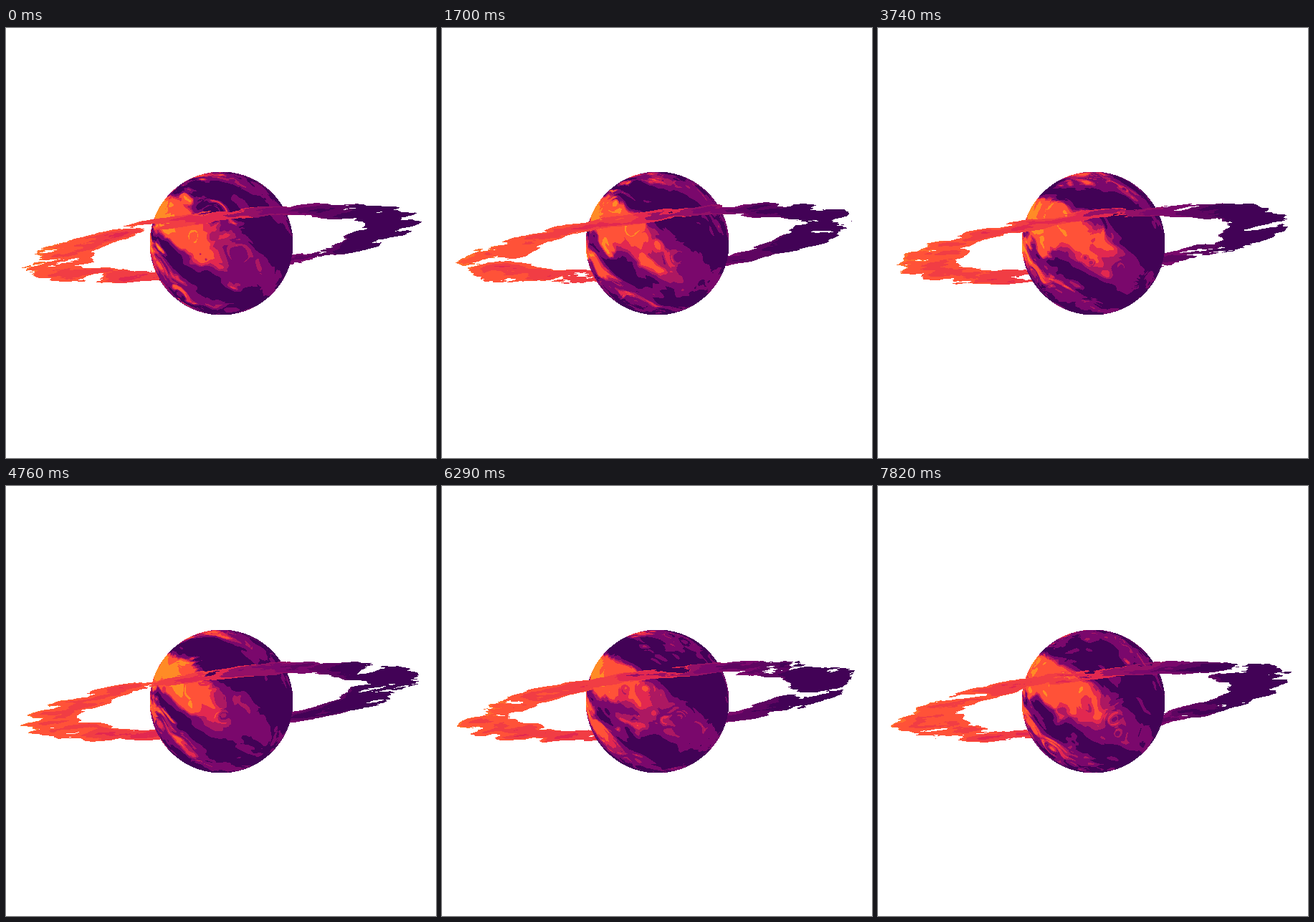
An HTML page with a canvas that plays this animation: 600 px wide and 600 px high, repeating every 7990 ms.

```html
<!DOCTYPE html>
<html lang="en">
<head>
<meta charset="utf-8">
<title>Ringed planet</title>
<style>
  html, body { margin: 0; width: 100%; height: 100%; overflow: hidden; background: #fff; }
  canvas { display: block; width: 100vmin; height: 100vmin; margin: auto; image-rendering: pixelated; }
</style>
</head>
<body>
<canvas id="stage" width="600" height="600"></canvas>
<script>
const STAGE = 600, PLANET = 200, CORNER = 200;
const STEP_MS = 170, STEPS = 47, TURN_STEPS = 60;
const PLANET_TILT = 2.56, RING_TILT = 3.26;
const LIGHT_X = -0.1, LIGHT_Y = 0.3;
const PLANET_SIZE = 10.107, RING_SIZE = 15, RING_WIDTH = 0.127, RING_FLATTEN = 6, RING_CUTOFF = 0.28;

const PALETTE = [
  [255, 139, 38], [255, 82, 56], [226, 40, 80],
  [172, 24, 98], [122, 8, 108], [66, 2, 86]
];

// Latitude (-1 to 1) and cloud density
const BANDS = [
  [-1, 0.64], [-0.75, 0.62], [-0.52, 0.46], [-0.32, 0.72], [-0.13, 0.42], [0.04, 0.41],
  [0.21, 0.78], [0.34, 0.77], [0.58, 0.44], [0.82, 0.58], [1, 0.62]
];

const fract = x => x - Math.floor(x);
const wrap = (x, n) => ((x % n) + n) % n;
const ease = t => t * t * (3 - 2 * t);
const smoothstep = (a, b, x) => ease(Math.min(1, Math.max(0, (x - a) / (b - a))));
const mix = (a, b, t) => a + (b - a) * t;
const pack = ([r, g, b]) => (255 << 24 | Math.round(b) << 16 | Math.round(g) << 8 | Math.round(r)) >>> 0;
const lightDistance = (x, y) => Math.hypot(x - LIGHT_X, y - LIGHT_Y);

function rotate(x, y, angle) {
  const c = Math.cos(angle), s = Math.sin(angle);
  x -= 0.5;
  y -= 0.5;
  return [x * c - y * s + 0.5, x * s + y * c + 0.5];
}

// Value noise that repeats every 2*rows by rows cells
function makeNoise(rows, seed, octaves) {
  const cols = rows * 2;
  const table = Float64Array.from({ length: cols * rows }, (_, i) =>
    fract(Math.sin((i % cols) * 12.9898 + Math.floor(i / cols) * 78.233) * 15.5453 * seed));
  const cell = (x, y) => table[wrap(y, rows) * cols + wrap(x, cols)];

  function noise(x, y) {
    const ix = Math.floor(x), iy = Math.floor(y);
    const u = ease(x - ix), v = ease(y - iy);
    return mix(mix(cell(ix, iy), cell(ix + 1, iy), u),
               mix(cell(ix, iy + 1), cell(ix + 1, iy + 1), u), v);
  }

  function fbm(x, y) {
    let sum = 0, scale = 0.5;
    for (let i = 0; i < octaves; i++) {
      sum += noise(x, y) * scale;
      x *= 2;
      y *= 2;
      scale /= 2;
    }
    return sum;
  }
  return { cell, fbm };
}

const clouds = makeNoise(10, 6.314, 3);
const dust = makeNoise(15, 8.461, 4);

function circleNoise(x, y) {
  const row = Math.floor(y);
  x += row * 0.31;
  const h = clouds.cell(Math.floor(x), row);
  const m = Math.hypot(fract(x) - 0.25 - h * 0.5, y - row - 0.25 - h * 0.5);
  return smoothstep(0, h * 0.25 + 1e-6, m * 0.75);
}

function turbulence(x, y, shift) {
  let sum = 0;
  for (let i = 11; i <= 20; i++) {
    sum += circleNoise(x * PLANET_SIZE * 0.3 + i + shift, y * PLANET_SIZE * 0.3 + i);
  }
  return sum;
}

function bandDensity(lat) {
  const i = Math.max(1, BANDS.findIndex(p => p[0] >= lat));
  const [a, from] = BANDS[i - 1], [b, to] = BANDS[i];
  return mix(from, to, smoothstep(a, b, lat));
}

function buildPlanet() {
  const cells = [];
  for (let py = 0; py < PLANET; py++) for (let px = 0; px < PLANET; px++) {
    const u = px / PLANET, v = py / PLANET;
    const r = Math.hypot(u - 0.5, v - 0.5);
    if (r >= 0.49999) continue;
    const [rx, ry] = rotate(u, v, PLANET_TILT);
    const bulge = 1 + Math.sqrt(1 - 4 * r * r);
    const x = (rx - 0.5) / bulge + 0.5, y = (ry - 0.5) / bulge + 0.5;
    cells.push({
      at: (py + CORNER) * STAGE + px + CORNER, x, y,
      light: lightDistance(u, v),
      density: bandDensity(y * 2 - 1) ** 2 * 7,
      base: clouds.fbm(x * PLANET_SIZE, y * PLANET_SIZE)
    });
  }
  return cells;
}

function buildRing() {
  const cells = [];
  for (let py = 0; py < STAGE; py++) for (let px = 0; px < STAGE; px++) {
    const u = px / STAGE, v = py / STAGE;
    const [x, ry] = rotate(u, v, RING_TILT);
    const y = (ry - 0.5) * RING_FLATTEN;
    const d = Math.hypot(x - 0.5, y);
    const mask = smoothstep(0.5 - RING_WIDTH * 2, 0.5 - RING_WIDTH, d) *
                 smoothstep(d - RING_WIDTH, d, 0.4);
    const hidden = ry < 0.5 && Math.hypot(u - 0.5, v - 0.5) < 1 / 6;
    if (mask < RING_CUTOFF || hidden) continue;
    cells.push({ at: py * STAGE + px, x, y: y + 0.5, mask, light: 2 * lightDistance(u, v) ** 2 });
  }
  return cells;
}

const planetColors = PALETTE.map(pack);
const planetLevels = [0.25, 0.5, 0.625, 0.75, 1];

function planetColor(value) {
  const i = planetLevels.findIndex(level => value < level);
  return planetColors[i < 0 ? 5 : i];
}

// Quarter steps: two blended ramps of three colours each
const ringColors = Array.from({ length: 9 }, (_, q) => {
  const start = q <= 4 ? 0 : 3;
  const pos = (q <= 4 ? q : q - 4) / 2;
  const i = Math.min(1, Math.floor(pos));
  return pack(PALETTE[start + i].map((c, k) => mix(c, PALETTE[start + i + 1][k], pos - i)));
});

const context = document.getElementById("stage").getContext("2d");
const picture = context.createImageData(STAGE, STAGE);
const pixels = new Uint32Array(picture.data.buffer);
const planet = buildPlanet(), ring = buildRing();

function drawPlanet(turn) {
  const shift = turn * 20;
  for (const { at, x, y, light, density, base } of planet) {
    const swirl = base + turbulence(x, y, shift);
    const cloud = density *
      clouds.fbm(x * PLANET_SIZE + swirl - shift, y * 2 * PLANET_SIZE + swirl);
    const shade = smoothstep(-0.2, 4.3 - cloud - light, cloud + light * 1.8);
    pixels[at] = planetColor(shade);
  }
}

function drawRing(turn) {
  const angle = turn * Math.PI * 2;
  for (const { at, x, y, mask, light } of ring) {
    const [rx, ry] = rotate(x, y, angle);
    const value = mask * dust.fbm(rx * RING_SIZE, ry * RING_SIZE);
    if (value < RING_CUTOFF) continue;
    pixels[at] = ringColors[Math.min(8, Math.floor((value + light) * 4))];
  }
}

let shown = -1;
function tick() {
  const step = Math.floor(performance.now() / STEP_MS) % STEPS;
  if (step !== shown) {
    shown = step;
    pixels.fill(0xffffffff);
    drawPlanet(step / TURN_STEPS);
    drawRing(step / TURN_STEPS);
    context.putImageData(picture, 0, 0);
  }
  requestAnimationFrame(tick);
}
tick();
</script>
</body>
</html>
```
